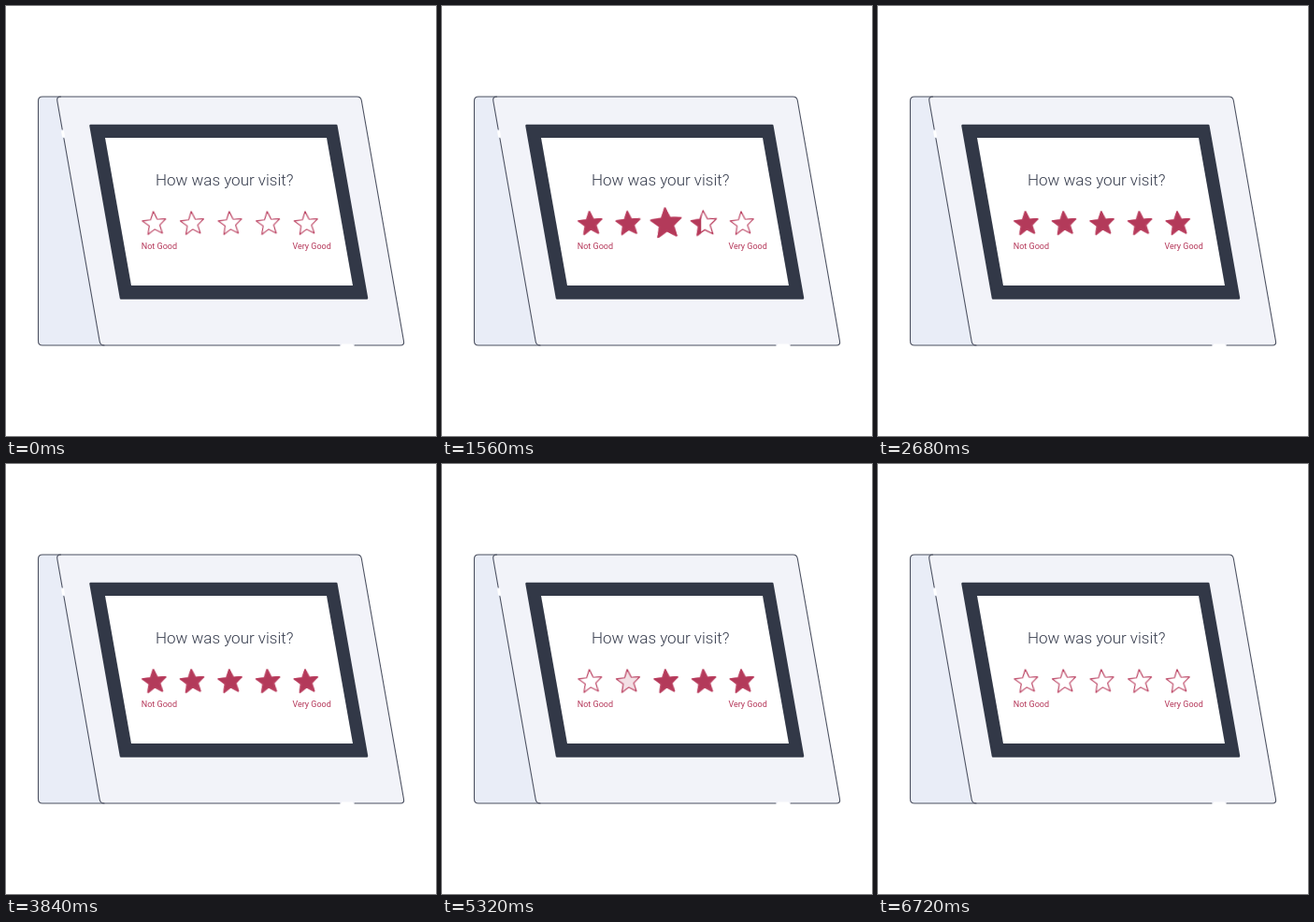
These frames come from a looping animation (460 by 460 pixels, 6.76 s). An HTML page:

```html
<!DOCTYPE html>
<html lang="en">
<head>
<meta charset="utf-8">
<title>Visit rating</title>
<style>
  html, body { margin: 0; width: 100%; height: 100%; overflow: hidden; background: #fff; }
  svg { display: block; width: 100%; height: 100%; }
  text { font-family: Roboto, sans-serif; }
  .title { font-size: 17px; font-weight: 300; fill: #343a4b; text-anchor: middle; }
  .label { font-size: 9px; fill: #b5385a; }
  .edge { fill: none; stroke: #4b5060; stroke-width: 1.1; stroke-linecap: round; }
  .star { stroke: #b83a5b; stroke-width: 1.1; stroke-linejoin: round; }
  .line { fill: none; }
  .full { fill: #b33a5a; }
  .pop, .full { animation: 6760ms linear calc(var(--i) * 240ms) infinite; }
  .pop { animation-name: pop; }
  .full { animation-name: fill; opacity: 0; }
  /* one star: swell while filling, settle, and fade much later */
  @keyframes pop {
    0%, 10.5% { transform: scale(1); animation-timing-function: ease-in-out; }
    15.53% { transform: scale(1.28); animation-timing-function: ease-in-out; }
    20.27%, 100% { transform: scale(1); }
  }
  @keyframes fill {
    0%, 10.49% { opacity: 0; clip-path: inset(0 100% 0 0); }
    10.5% { opacity: 1; clip-path: inset(0 100% 0 0); }
    15.53% { opacity: 1; clip-path: inset(0 0 0 0); }
    72.19% { opacity: 1; clip-path: inset(0 0 0 0); }
    75.74%, 100% { opacity: 0; clip-path: inset(0 0 0 0); }
  }
</style>
</head>
<body>
<svg viewBox="0 0 460 460">
  <defs>
    <polygon id="star" transform="rotate(-5)" points="0,-13.2 3.47,-4.77 12.55,-4.08 5.61,1.82 7.76,10.68 0,5.9 -7.76,10.68 -5.61,1.82 -12.55,-4.08 -3.47,-4.77"/>
  </defs>

  <!-- kiosk body -->
  <path fill="#e9edf7" d="M39 97H58L105 363H39Q34.5 363 34.5 358.500V101.500Q34.500 97 39 97Z"/>
  <path fill="#f2f3f9" d="M58.500 97H375.500Q379.500 97 380.300 101L425.500 358.500Q426.300 363 422 363H105Q101 363 100.200 359L54.800 101.500Q54 97 58.500 97Z"/>
  <path class="edge" d="M357 363H39Q34.500 363 34.500 358.500V101.500Q34.500 97 39 97H375.500Q379.500 97 380.300 101L425.500 358.500Q426.300 363 422 363H373"/>
  <path class="edge" d="M58.500 97Q54 97 54.800 101.500L60.200 132M61.900 141.500L100.200 359Q101 363 105 363"/>
  <path d="M60.500 133.500L61.600 140M359 363H371" fill="none" stroke="#fff" stroke-width="3"/>

  <!-- screen -->
  <path d="M90.500 128H353.300L386 312.500H123Z" fill="#323847" stroke="#323847" stroke-width="2.500" stroke-linejoin="round"/>
  <path d="M106 141H343L371 299H134Z" fill="#fff"/>
  <text class="title" x="233.700" y="192">How was your visit?</text>
  <text class="label" x="144.800" y="260">Not Good</text>
  <text class="label" x="347.800" y="260" text-anchor="end">Very Good</text>
  <g id="stars"></g>
</svg>
<script>
  const starAt = i => `
    <g transform="translate(${158.7 + i * 40.6} 233)" style="--i:${i}">
      <g class="pop">
        <use href="#star" class="star line"/>
        <use href="#star" class="star full"/>
      </g>
    </g>`;
  document.getElementById('stars').innerHTML = [0, 1, 2, 3, 4].map(starAt).join('');
</script>
</body>
</html>
```
